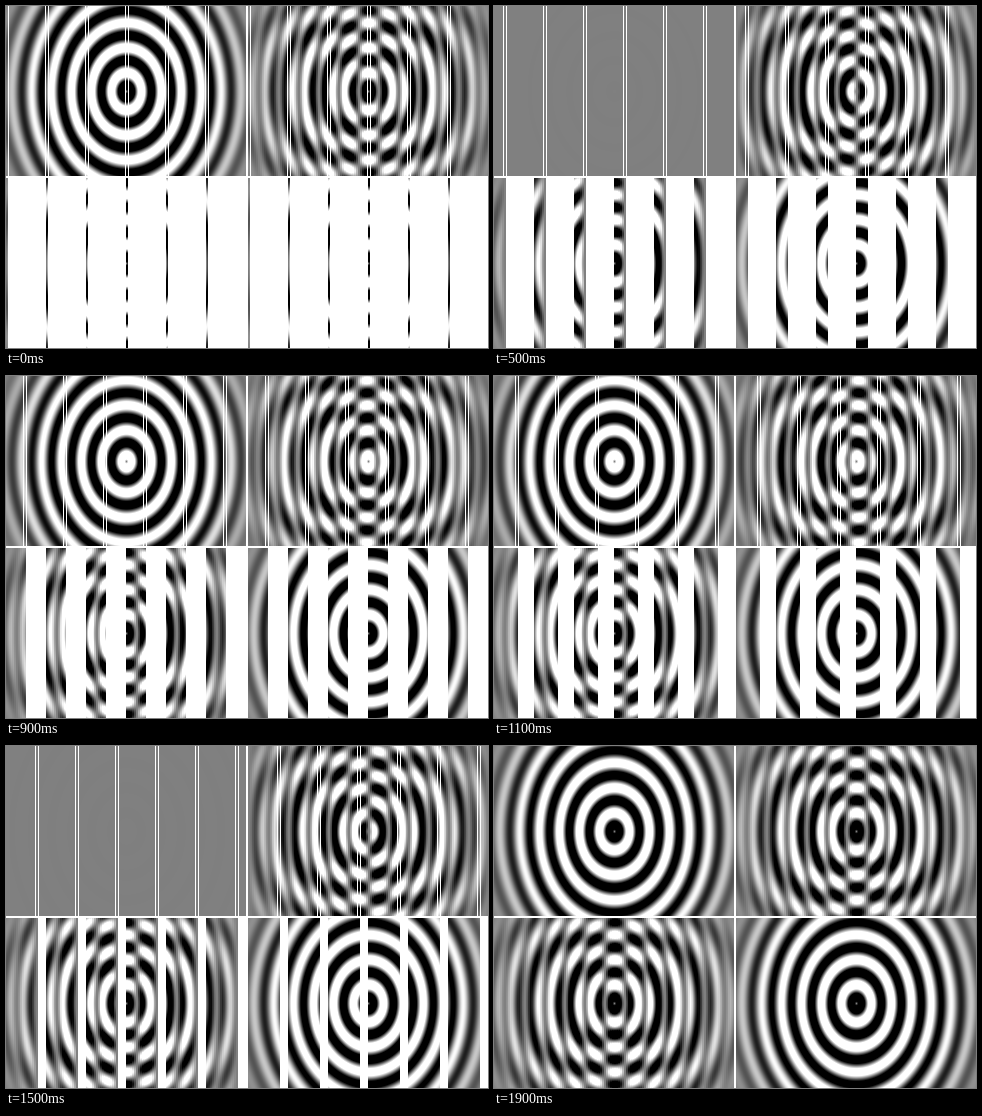
An HTML page with a canvas for the animation above (4900 ms loop, 482 by 342 pixels).

```html
<!DOCTYPE html>
<html lang="en">
<head>
<meta charset="utf-8">
<title>Time scanner</title>
<style>
  html, body { margin: 0; width: 100%; height: 100%; overflow: hidden; background: #fff; }
  canvas { display: block; }
</style>
</head>
<body>
<canvas id="stage" width="482" height="342"></canvas>
<script>
const W = 240, H = 170, GAP = 2;
const STRIP = 40, SLIT = 2, STEPS = 20;
const STEP_MS = 100, LOOP_MS = 4900;
const WAVE = 20, SQUEEZE = 0.8, REACH = 140, GAIN = 2;
const TAU = 2 * Math.PI;

const ctx = document.getElementById('stage').getContext('2d');
const panel = ctx.createImageData(W, H);
const pixels = new Uint32Array(panel.data.buffer);

// Standing wave around the panel centre, contracted along x and fading outwards
const wave = new Float32Array(W * H);
for (let y = 0; y < H; y++) {
  for (let x = 0; x < W; x++) {
    const r = Math.hypot(x - W / 2, (y - H / 2) * SQUEEZE);
    const fade = Math.max(0, Math.cos(TAU / 4 * r / REACH));
    wave[y * W + x] = GAIN * fade * Math.sin(TAU * r / WAVE);
  }
}

const swing = step => Math.cos(TAU * step / STEPS);
const slitOf = x => Math.floor(x % STRIP / SLIT);

// swingAt(x) gives the wave's momentary factor in column x, or null for white
function drawPanel(left, top, swingAt) {
  for (let x = 0; x < W; x++) {
    const factor = swingAt(x);
    for (let i = x; i < W * H; i += W) {
      const level = factor === null ? 1 : Math.max(-1, Math.min(1, -wave[i] * factor));
      const grey = Math.round(127.5 + 127.5 * level);
      pixels[i] = 0xff000000 | grey * 0x010101;
    }
  }
  ctx.putImageData(panel, left, top);
}

function drawStep(step) {
  const done = step === STEPS - 1;
  const now = done ? STEPS : step;
  const right = W + GAP, bottom = H + GAP;
  const scanned = x => slitOf(x) <= now;

  ctx.fillStyle = '#fff';
  ctx.fillRect(0, 0, 482, 342);
  drawPanel(0, 0, () => swing(now));
  drawPanel(right, 0, x => swing(now - slitOf(x)));
  drawPanel(0, bottom, x => scanned(x) ? swing(slitOf(x)) : null);
  drawPanel(right, bottom, x => scanned(x) ? 1 : null);

  if (done) return;
  // White borders on both sides of each scanning slit
  for (const left of [0, right]) {
    for (let x = step * SLIT; x < W; x += STRIP) {
      if (x > 0) ctx.fillRect(left + x - 1, 0, 1, H);
      ctx.fillRect(left + x + SLIT, 0, 1, H);
    }
  }
}

let shown = -1;
const start = performance.now();
function tick() {
  const t = (performance.now() - start) % LOOP_MS;
  const step = Math.min(STEPS - 1, Math.floor(t / STEP_MS));
  if (step !== shown) drawStep(shown = step);
  requestAnimationFrame(tick);
}
tick();
</script>
</body>
</html>
```
